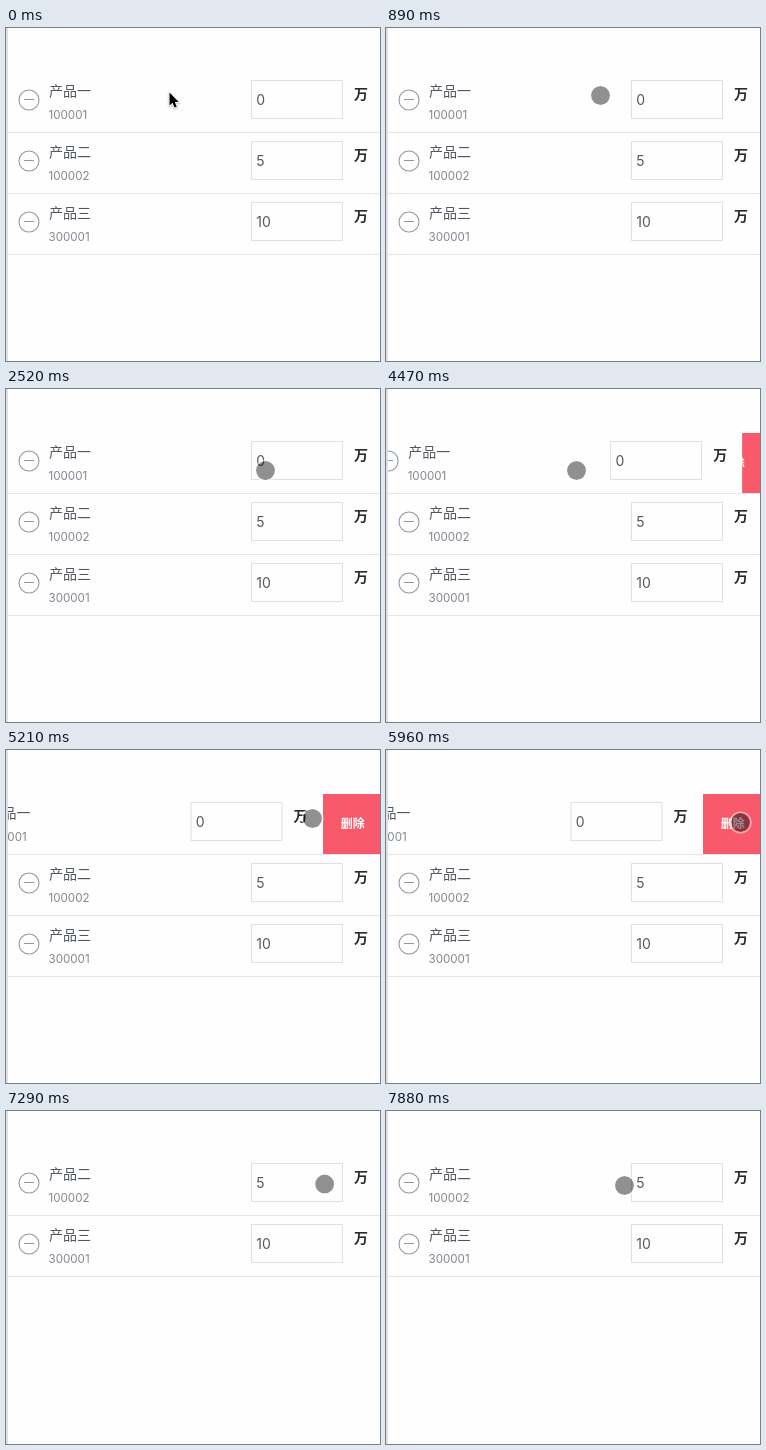
Write an HTML page with a canvas that moves like this. It is 374x333 px and loops after 8 s.

```html
<!DOCTYPE html>
<html lang="zh-CN">
<head>
<meta charset="utf-8">
<title>滑动删除</title>
<style>
html, body { margin: 0; width: 100%; height: 100%; overflow: hidden; background: #fefefe; }
canvas { display: block; }
</style>
</head>
<body>
<canvas id="stage"></canvas>
<script>
const W = 374, H = 333, LOOP = 8000;
const TICK = 148.6; // the picture advances in steps of this many ms
const TOP = 44, ROW = 61, OPEN = -60.5, SLIDE = 2.9;
const TOUCH_TICK = 4, OPEN_TICK = 29, CLOSE_TICK = 45.1;
const CJK = '"Noto Sans CJK SC", "Noto Sans CJK", sans-serif';
const LATIN = 'Inter, "Noto Sans CJK SC", sans-serif';

const products = [
  { name: '产品一', code: '100001', value: '0' },
  { name: '产品二', code: '100002', value: '5' },
  { name: '产品三', code: '300001', value: '10' }
];

// Pointer moves, timed in ticks
const home = { x: 163.5, y: 64.5 };
const moves = [
  { from: 3, to: 6, x: 214.5, y: 67.5 },
  { from: 7, to: 11, x: 264.5, y: 73 },
  { from: 15, to: 17, x: 259.5, y: 81.5 },
  { from: 29, to: 30, x: 190.5, y: 81.5 },
  { from: 30, to: 35, x: 306.5, y: 68.5 },
  { from: 35, to: 38, x: 354.5, y: 72.5 },
  { from: 48, to: 53, x: 238.5, y: 74.5 }
];

const canvas = document.getElementById('stage');
const ctx = canvas.getContext('2d');
const dpr = window.devicePixelRatio || 1;
canvas.width = W * dpr;
canvas.height = H * dpr;
canvas.style.width = W + 'px';
canvas.style.height = H + 'px';

const ramp = (n, start, length) => Math.min(1, Math.max(0, (n - start) / length));
const easeOut = p => Math.sin(p * Math.PI / 2);

function pointerAt(n) {
  let { x, y } = home;
  for (const m of moves) {
    const p = easeOut(ramp(n, m.from, m.to - m.from));
    x += (m.x - x) * p;
    y += (m.y - y) * p;
  }
  return { x, y };
}

function swipeAt(n) {
  return OPEN * (ramp(n, OPEN_TICK, SLIDE) - ramp(n, CLOSE_TICK, SLIDE));
}

function rect(x, y, w, h, color) {
  ctx.fillStyle = color;
  ctx.fillRect(x, y, w, h);
}

function text(str, x, y, font, color) {
  ctx.font = font;
  ctx.fillStyle = color;
  ctx.fillText(str, x, y);
}

function minusIcon(x, y) {
  ctx.strokeStyle = '#9497a0';
  ctx.lineWidth = 1.1;
  ctx.beginPath();
  ctx.arc(x, y, 10, 0, Math.PI * 2);
  ctx.stroke();
  rect(x - 5, y - 1, 10, 1, '#9497a0');
}

function drawRow(item, y, dx) {
  if (dx < 0) {
    rect(317, y, 60, 60, '#f95a6b');
    text('删除', 334.7, y + 34, 'bold 12px ' + CJK, '#fff');
  }
  ctx.save();
  ctx.translate(dx, y);
  rect(0, 0, 377, 60, '#fefefe');
  minusIcon(23, 28);
  text(item.name, 43, 23.6, '14px ' + CJK, '#515660');
  text(item.code, 42.5, 47, '11.6px ' + LATIN, '#83868f');
  ctx.strokeStyle = '#e0e0e2';
  ctx.lineWidth = 1;
  ctx.strokeRect(245.5, 8.5, 91, 38);
  text(item.value, 250.3, 33, '14px ' + LATIN, '#55585e');
  text('万', 348, 27.2, 'bold 14px ' + CJK, '#2b2b2b');
  ctx.restore();
  rect(2, y + 60, W - 2, 1, '#e6e6e8');
}

function arrow(x, y) {
  ctx.save();
  ctx.translate(x, y);
  ctx.beginPath();
  ctx.moveTo(0, 0);
  ctx.lineTo(0, 13);
  ctx.lineTo(3, 10.3);
  ctx.lineTo(5, 15);
  ctx.lineTo(7.3, 14);
  ctx.lineTo(5.3, 9.4);
  ctx.lineTo(9.3, 9.4);
  ctx.closePath();
  ctx.shadowColor = 'rgba(0,0,0,.3)';
  ctx.shadowBlur = 2 * dpr;
  ctx.shadowOffsetY = dpr;
  ctx.strokeStyle = '#fff';
  ctx.lineWidth = 1.6;
  ctx.stroke();
  ctx.shadowColor = 'transparent';
  ctx.fillStyle = '#000';
  ctx.fill();
  ctx.restore();
}

function touch(x, y) {
  ctx.beginPath();
  ctx.arc(x, y, 9.5, 0, Math.PI * 2);
  ctx.fillStyle = 'rgba(0,0,0,.43)';
  ctx.fill();
  ctx.beginPath();
  ctx.arc(x, y, 10.3, 0, Math.PI * 2);
  ctx.strokeStyle = 'rgba(255,255,255,.5)';
  ctx.lineWidth = 1.6;
  ctx.stroke();
}

function draw(t) {
  const n = Math.floor((t + 7) / TICK);
  const dx = swipeAt(n);
  const rows = n < CLOSE_TICK ? products : products.slice(1);

  ctx.setTransform(dpr, 0, 0, dpr, 0, 0);
  rect(0, 0, W, H, '#fefefe');
  rows.forEach((item, i) => drawRow(item, TOP + i * ROW, i ? 0 : dx));
  rect(0, 0, 2, H, '#e0e0e0');

  const { x, y } = pointerAt(n);
  (n < TOUCH_TICK ? arrow : touch)(x, y);
}

const start = performance.now();
function frame() {
  draw((performance.now() - start) % LOOP);
  requestAnimationFrame(frame);
}
frame();
</script>
</body>
</html>
```
